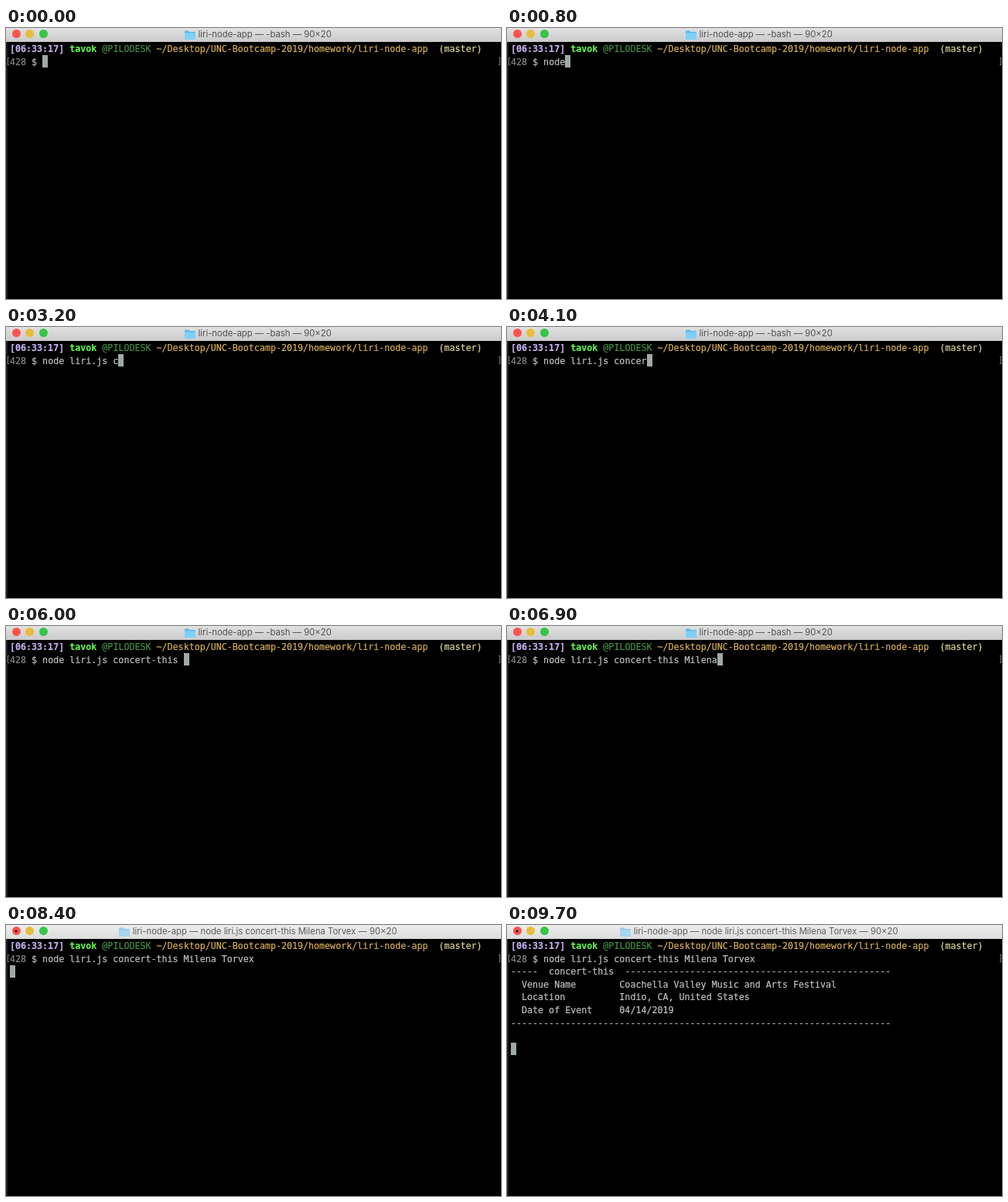
Write an HTML page that moves like this. It is 640 px wide and 350 px high and loops after 9.8 s.

```html
<!DOCTYPE html>
<html lang="en">
<head>
<meta charset="utf-8">
<title>Terminal</title>
<style>
  html, body { margin: 0; width: 100%; height: 100%; overflow: hidden; background: #000; }
  #stage { position: relative; width: 640px; height: 350px; overflow: hidden; background: #000; }
  #stage div, #stage i { position: absolute; box-sizing: border-box; }
  #edge { left: 0; top: 18px; width: 2px; height: 332px; background: #202020; }
  #bar { left: 0; top: 0; width: 640px; height: 17.5px; background: linear-gradient(#e2e1e2, #cbcacb); }
  #bar i { top: 2px; width: 11px; height: 11px; border-radius: 50%; }
  #bar.running { background: linear-gradient(#eeedee, #dddcdd); }
  #bar.running svg { opacity: .6; }
  #bar.running #title { color: #5c5c5c; }
  #bar.running #dot::after { content: ""; position: absolute; left: 3.5px; top: 3.5px; width: 4px; height: 4px;
    border-radius: 50%; background: #7c1512; }
  #title { left: 5.7px; width: 640px; top: 0; height: 17px; display: flex; align-items: center;
    justify-content: center; color: #505050; white-space: pre; font: 11.3px/17px Inter, sans-serif; }
  #title svg { width: 14px; height: 12px; margin-right: 4px; }
  #text { position: absolute; left: 5px; top: 19px; margin: 0; color: #c0c1c1; -webkit-text-stroke: .2px;
    font: 11.66px/16.6px "DejaVu Sans Mono", monospace; }
  #text b, #text span { color: var(--c); }
  #cursor { width: 7px; height: 16px; background: #a0a8a9; }
  .mark { top: 38px; width: 2px; height: 10px; border: 1px solid #777; }
</style>
</head>
<body>
<div id="stage">
  <div id="edge"></div>
  <div id="bar">
    <i id="dot" style="left:7.5px;background:#fc5550"></i>
    <i style="left:25px;background:#e8bd3c"></i>
    <i style="left:42.5px;background:#35c548"></i>
    <div id="title">
      <svg viewBox="0 0 14 12"><path d="M0 1.5Q0 .5 1 .5H5L6.5 2H13Q14 2 14 3V11Q14 12 13 12H1Q0 12 0 11Z" fill="#5fb9ea"/><path d="M0 3.5H14V11Q14 12 13 12H1Q0 12 0 11Z" fill="#7fd0f7"/></svg><span id="name"></span>
    </div>
  </div>
  <div class="mark" style="left:2px;border-right:0"></div>
  <div class="mark" style="left:637px;border-left:0"></div>
  <div id="cursor"></div>
  <pre id="text"></pre>
</div>
<script>
const LOOP = 9800, ENTER = 8000, RESULT = 9700;
const COL = 7.02, ROW = 16.6;
const command = 'node liri.js concert-this Milena Torvex';
// [time in ms, characters typed]
const typing = [[0, 0], [300, 0], [1900, 13], [2900, 13], [4100, 19], [5700, 26], [6000, 26], [6900, 32], [7900, 39]];

const $ = id => document.getElementById(id);
const paint = (color, text, tag = 'span') => `<${tag} style="--c:${color}">${text}</${tag}>`;
const field = (label, value) => '  ' + label.padEnd(18) + value;

const prompt = paint('#c5b0ee', '[06:33:17]', 'b') + ' ' + paint('#62ee50', 'tavok', 'b') + ' ' +
  paint('#478f45', '@PILODESK') + ' ' +
  paint('#d6ad58', '~/Desktop/UNC-Bootcamp-2019/homework/liri-node-app') + '  ' +
  paint('#dcd898', '(master)') + '\n' + paint('#858585', '428') + ' $ ';

const result = '\n' + [
  '-----  concert-this  ' + '-'.repeat(49),
  field('Venue Name', 'Coachella Valley Music and Arts Festival'),
  field('Location', 'Indio, CA, United States'),
  field('Date of Event', '04/14/2019'),
  '-'.repeat(70)
].join('\n');

function typedAt(t) {
  const next = typing.findIndex(key => key[0] > t);
  if (next < 0) return command.length;
  const [t0, n0] = typing[next - 1], [t1, n1] = typing[next];
  return Math.floor(n0 + (n1 - n0) * (t - t0) / (t1 - t0) + 1e-6);
}

function render(t) {
  const count = typedAt(t), running = t >= ENTER, done = t >= RESULT;
  $('text').innerHTML = prompt + command.slice(0, count) + (done ? result : '');
  $('name').textContent = `liri-node-app — ${running ? command : '-bash'} — 90×20`;
  $('bar').classList.toggle('running', running);
  const col = running ? 0 : 6 + count, row = done ? 8 : running ? 2 : 1;
  $('cursor').style.left = 5 + col * COL + 'px';
  $('cursor').style.top = 18.8 + row * ROW + 'px';
}

const start = performance.now();
let shown = -1;
function tick() {
  const t = Math.floor((performance.now() - start) % LOOP / 100) * 100;
  if (t !== shown) render(shown = t);
  requestAnimationFrame(tick);
}
tick();
</script>
</body>
</html>
```
